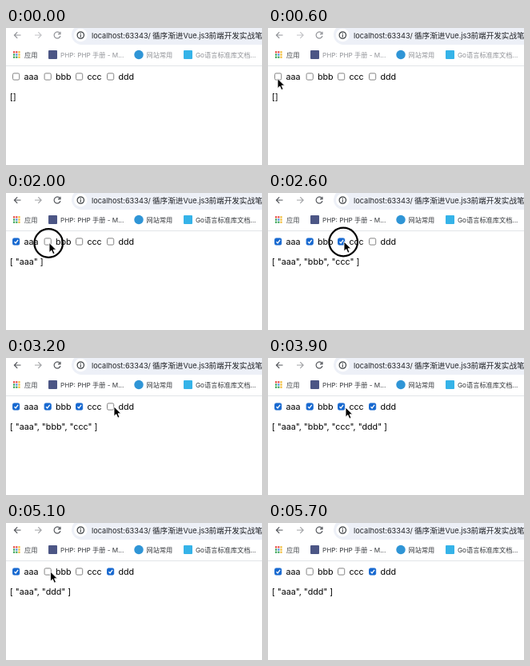
Animation, 320 px wide and 172 px high, one loop 5900 ms. Source, as an HTML page:

```html
<!DOCTYPE html>
<html lang="zh-CN">
<head>
<meta charset="utf-8">
<title>Checkbox list</title>
<style>
  html, body { margin: 0; width: 100%; height: 100%; overflow: hidden; background: #fff; }
  svg { display: block; width: 320px; height: 172px; }
  text { font-family: Inter, "Noto Sans CJK SC", "Noto Sans CJK", sans-serif; white-space: pre; }
  .url { font-size: 9.2px; fill: #202226; }
  .url .zh { font-size: 9.6px; }
  .mark { font-size: 8.2px; }
  .page { font-size: 10.7px; fill: #000; }
  .line { fill: none; stroke-width: 1.2; }
</style>
</head>
<body>
<svg viewBox="0 0 320 172">
  <rect width="320" height="172" fill="#fff"/>
  <rect x="82" y="-4" width="260" height="25" rx="12.5" fill="#edf0f7"/>
  <g id="nav" class="line">
    <path d="M18.5 9H10.5M14.2 5.2 10.4 9l3.8 3.8"/>
    <path d="M36 9h8M40.3 5.2 44.1 9l-3.8 3.8" opacity=".55"/>
    <path d="M67.4 6.6A4 4 0 1 0 68 10M68 4.8V7.7H65"/>
  </g>
  <circle cx="93.3" cy="9" r="8.3" fill="#fff"/>
  <g class="line" stroke="#3c4043">
    <circle cx="93.3" cy="9" r="4.2"/>
    <path d="M93.3 8.6v2.8M93.3 6.5v1.2"/>
  </g>
  <g class="url">
    <text x="107" y="12.5">localhost:63343/</text>
    <text class="zh" x="183" y="12.5">循序渐进</text>
    <text x="221.5" y="12.5">Vue.js3</text>
    <text class="zh" x="253.5" y="12.5">前端开发实战笔</text>
  </g>
  <g id="apps"></g>
  <rect x="53" y="28" width="11" height="11" rx="1" fill="#4c5685"/>
  <circle cx="166" cy="33.5" r="5.7" fill="#2f95d6"/>
  <rect x="222" y="28" width="11" height="11" rx="1" fill="#35b3e8"/>
  <text class="mark" x="23" y="36.6" fill="#45484c">应用</text>
  <g id="marks" class="mark">
    <text x="68" y="36.6">PHP: PHP 手册 - M...</text>
    <text x="175.5" y="36.6">网站常用</text>
    <text x="237" y="36.6">Go语言标准库文档...</text>
  </g>
  <path d="M0 47.5H320" stroke="#e2e4e8"/>
  <g id="boxes" class="page"></g>
  <text id="list" class="page" x="4.8" y="90.3"></text>
  <circle id="ring" r="17.8" fill="none" stroke="#000" stroke-width="2.2"/>
  <path id="cursor" d="M0 0V12.2L2.8 9.6 4.8 14.2 7 13.2 5 8.8H8.8Z" fill="#000" stroke="#fff" stroke-width=".9" stroke-linejoin="round"/>
</svg>
<script>
const LOOP = 5900, STEP = 100;
const $ = id => document.getElementById(id);

function add(parent, tag, attrs) {
  const el = document.createElementNS('http://www.w3.org/2000/svg', tag);
  for (const key in attrs) el.setAttribute(key, attrs[key]);
  return parent.appendChild(el);
}

// on/off: checked interval; press: interval of the darker pressed look
const items = [
  { name: 'aaa', x: 8, on: 1400, off: LOOP },
  { name: 'bbb', x: 47.6, on: 2100, off: 5000, press: [4800, 5000] },
  { name: 'ccc', x: 87, on: 2600, off: 4300, press: [4200, 4300] },
  { name: 'ddd', x: 126, on: 3400, off: LOOP }
];
const rings = [[800, 1000], [1300, 1500], [2000, 2200], [2500, 2700]];
const focusAt = 900;

// time, x, y of the pointer tip
const path = [
  [100, 121, 133], [200, 92, 112], [300, 62, 92], [400, 36, 76], [500, 18, 67],
  [600, 12, 63.5], [800, 15, 61.5], [1200, 15.2, 60.5], [1500, 15.2, 60.5],
  [1800, 54, 62.5], [2100, 54, 62.5], [2200, 95, 61.5], [2600, 95, 61],
  [3000, 135, 61], [3400, 135, 61], [3600, 92, 61], [3700, 124, 73],
  [3900, 97, 62], [4300, 96, 62], [4700, 56, 62], [5100, 55.5, 61],
  [5300, 66, 76], [5600, 153, 160]
];
const hideAt = 5700;

const appColors = ['#e8453c', '#e8453c', '#f2b92d', '#35a455', '#4386f0', '#f2b92d', '#35a455', '#35a455', '#f2b92d'];
appColors.forEach((fill, i) =>
  add($('apps'), 'rect', { x: 9 + i % 3 * 3.2, y: 29.2 + Math.floor(i / 3) * 3.2, width: 2.2, height: 2.2, fill }));

for (const item of items) {
  item.box = add($('boxes'), 'rect', { x: item.x + .5, y: 56.9, width: 8.2, height: 8.2, rx: 1.6, 'stroke-width': .9 });
  item.tick = add($('boxes'), 'path', {
    d: `M${item.x + 2.5} 61.2l1.6 1.7 3-4`, fill: 'none', stroke: '#fff', 'stroke-width': 1.3
  });
  add($('boxes'), 'text', { x: item.x + 14.4, y: 65 }).textContent = item.name;
}

const within = (t, [from, to]) => t >= from && t < to;
const show = (el, visible) => el.setAttribute('visibility', visible ? 'visible' : 'hidden');

function pointerAt(t) {
  const i = path.findIndex(p => p[0] > t);
  if (i < 0) return path[path.length - 1].slice(1);
  if (i === 0) return path[0].slice(1);
  const [a, b] = [path[i - 1], path[i]];
  const k = (t - a[0]) / (b[0] - a[0]);
  return [1, 2].map(n => a[n] + (b[n] - a[n]) * k);
}

function draw(t) {
  const active = t >= focusAt;
  $('nav').setAttribute('stroke', active ? '#55585d' : '#929499');
  $('marks').setAttribute('fill', active ? '#36393d' : '#929499');

  for (const item of items) {
    item.checked = within(t, [item.on, item.off]);
    const pressed = item.press && within(t, item.press);
    const blue = pressed ? '#0d4fa8' : '#1668d0';
    item.box.setAttribute('fill', item.checked ? blue : '#fff');
    item.box.setAttribute('stroke', item.checked ? blue : '#767676');
    show(item.tick, item.checked);
  }
  const names = items.filter(item => item.checked).map(item => `"${item.name}"`);
  $('list').textContent = names.length ? `[ ${names.join(', ')} ]` : '[]';

  const [x, y] = pointerAt(t);
  $('cursor').setAttribute('transform', `translate(${x} ${y})`);
  show($('cursor'), within(t, [path[0][0], hideAt]));
  $('ring').setAttribute('cx', x - .8);
  $('ring').setAttribute('cy', y + .5);
  show($('ring'), rings.some(span => within(t, span)));
}

const start = performance.now();
function tick() {
  const t = Math.max(0, performance.now() - start) % LOOP;
  draw(Math.floor(t / STEP) * STEP);
  requestAnimationFrame(tick);
}
tick();
</script>
</body>
</html>
```
